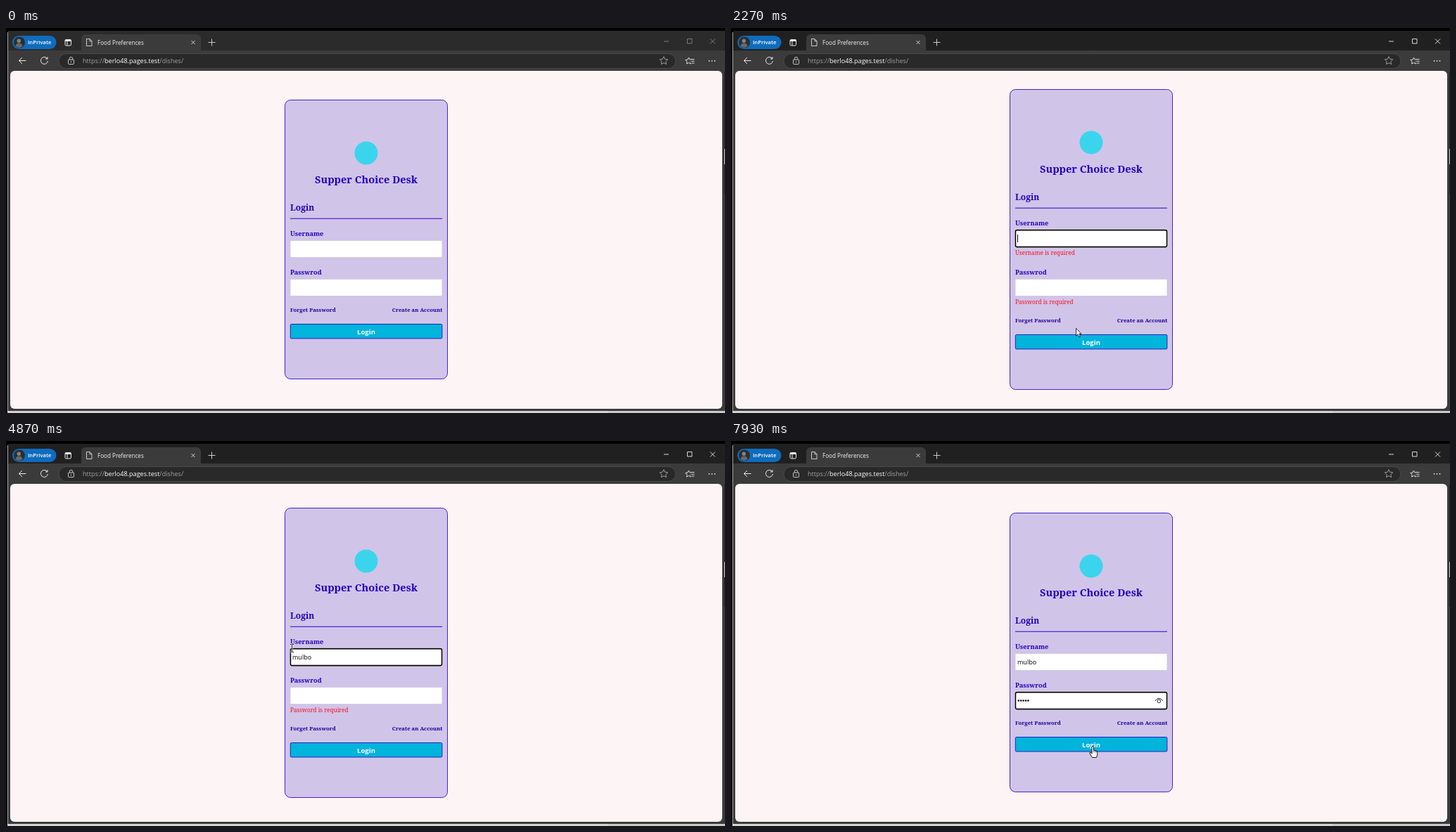
An HTML page with a canvas that plays this animation: 1022x548 px, repeating every 8 s.

```html
<!DOCTYPE html>
<html lang="en">
<head>
<meta charset="utf-8">
<title>Food Preferences</title>
<style>
html, body { margin: 0; width: 100%; height: 100%; overflow: hidden; background: #000; }
canvas { display: block; width: 1022px; height: 548px; }
</style>
</head>
<body>
<canvas id="stage" width="1022" height="548"></canvas>
<script>
const ctx = document.getElementById('stage').getContext('2d');
const SANS = '"Open Sans", sans-serif', SERIF = '"Noto Serif", serif';
const INK = '#2200b9', EDGE = '#2a00c8', ERROR = '#f5101f', CHROME = '#3b3b3b';
const LOOP = 8000, TICKS_PER_SECOND = 15;

// All times are in ticks of 1/15 s.
const CLICK_USER = 10, PRESS = 32, SUBMIT = 34, CLICK_PASS = 88, BLINK = 8;
const USER_KEYS = [57, 58, 61, 63, 65], PASS_KEYS = [99, 101, 102, 104, 106];
const USER_NAME = 'mulbo';
const CARET_RESETS = [CLICK_USER, SUBMIT, ...USER_KEYS, CLICK_PASS, ...PASS_KEYS];

// Each stop is tick, x, y.
const POINTER = [
  [3, 800, 530], [5, 640, 425], [7, 530, 350], [9, 480, 322], [10, 477, 320],
  [24, 477, 320], [27, 481, 352], [30, 489, 412], [31, 490, 427],
  [38, 490, 427], [39, 500, 417], [41, 440, 370], [43, 362, 326], [45, 317, 304],
  [47, 356, 294], [49, 406, 295],
  [81, 406, 295], [83, 420, 312], [85, 446, 343], [87, 459, 354],
  [116, 459, 354], [117, 475, 381], [118, 503, 424], [119, 514, 434]
];

function pointerAt(tick) {
  if (tick < POINTER[0][0]) return null;
  const next = POINTER.findIndex(p => p[0] >= tick);
  const b = POINTER[next], a = POINTER[Math.max(0, next - 1)];
  const k = b === a ? 0 : (tick - a[0]) / (b[0] - a[0]);
  return { x: Math.round(a[1] + (b[1] - a[1]) * k), y: Math.round(a[2] + (b[2] - a[2]) * k) };
}

function stateAt(tick) {
  const count = keys => keys.filter(k => k <= tick).length;
  const user = count(USER_KEYS), pass = count(PASS_KEYS);
  const userError = tick >= SUBMIT && !user, passError = tick >= SUBMIT && !pass;
  let focus = '';
  if (tick >= CLICK_PASS) focus = 'pass';
  else if (tick >= SUBMIT || (tick >= CLICK_USER && tick < PRESS)) focus = 'user';
  const reset = Math.max(...CARET_RESETS.filter(k => k <= tick));
  const caret = Math.floor((tick - reset) / BLINK) % 2 === 0;
  return { active: tick >= CLICK_USER, user, pass, userError, passError, focus, caret };
}

function layoutFor(s) {
  const u = s.userError ? 15 : 0, p = s.passError ? 15 : 0;
  const top = 102 - Math.floor((u + p) / 2);
  return { top, height: 398 + u + p, user: top + 200, pass: top + 255 + u, foot: top + 299 + u + p, button: top + 319 + u + p };
}

function box(x, y, w, h, r, fill, stroke, line = 1) {
  ctx.beginPath();
  ctx.roundRect(x, y, w, h, r);
  if (fill) { ctx.fillStyle = fill; ctx.fill(); }
  if (stroke) { ctx.strokeStyle = stroke; ctx.lineWidth = line; ctx.stroke(); }
}

function disc(x, y, r, fill) {
  ctx.beginPath();
  ctx.arc(x, y, r, 0, Math.PI * 2);
  ctx.fillStyle = fill;
  ctx.fill();
}

function path(d, stroke, line = 1, fill) {
  const p = new Path2D(d);
  if (fill) { ctx.fillStyle = fill; ctx.fill(p); }
  if (stroke) { ctx.strokeStyle = stroke; ctx.lineWidth = line; ctx.stroke(p); }
}

function text(str, x, y, font, color, align = 'left') {
  ctx.font = font;
  ctx.fillStyle = color;
  ctx.textAlign = align;
  ctx.fillText(str, x, y);
  return x + ctx.measureText(str).width;
}

function star(x, y, r, color) {
  ctx.beginPath();
  for (let i = 0; i < 10; i++) {
    const a = Math.PI * (i / 5 - 0.5), d = i % 2 ? r * 0.5 : r;
    ctx.lineTo(x + d * Math.cos(a), y + d * Math.sin(a));
  }
  ctx.closePath();
  ctx.strokeStyle = color;
  ctx.lineWidth = 0.9;
  ctx.stroke();
}

function drawTitleBar(active) {
  box(0, 0, 1022, 548, 0, '#000');
  box(3, 4, 1019, 541, 0, CHROME);
  box(3, 4, 1019, 28, 0, active ? '#202020' : '#2b2b2b');
  box(2, 6, 1, 539, 0, '#aaa');
  box(2, 545, 1020, 3, 0, '#d4d4d4');
  box(855, 545, 167, 3, 0, '#c9c9c9');
  box(1021, 62, 1, 174, 0, '#222');
  box(1021, 172, 1, 22, 0, '#ccc');

  box(9, 11, 62.5, 19, 9.5, '#0f6cbd');
  disc(19, 20.5, 8, '#2c2e31');
  disc(18.3, 18.2, 2.7, '#858380');
  path('M13.5 26 Q14 21.5 18.5 21.5 Q23 21.5 23.5 26 Q19 30 13.5 26', null, 0, '#65686b');
  text('InPrivate', 31, 23.3, '600 7.7px ' + SANS, '#fff');

  box(84, 16.5, 8.5, 8.5, 1.5, null, '#eee');
  box(84, 16.5, 8.5, 2.5, 1, '#eee');
  box(86.5, 16.5, 1, 8, 0, '#eee');

  box(107, 9, 170, 23, [6, 6, 0, 0], CHROME);
  path('M114.5 15.5 H119 L122 18.7 V25.5 H114.5 Z M119 15.5 V18.7 H122', '#ddd', 0.9);
  text('Food Preferences', 130, 23.5, '8.1px ' + SANS, '#f3f3f3');
  path('M263.5 18 l5 5 m0 -5 l-5 5', '#ddd', 0.9);
  path('M287.5 20.5 h10 m-5 -5 v10', '#ddd', 0.9);
  path('M935 19 h7 M968.5 15.5 h6.5 v6.5 h-6.5 z M1001 15.5 l7 7 m0 -7 l-7 7', active ? '#eee' : '#858585', 0.9);
}

function drawToolbar() {
  path('M28.5 46.5 H18.5 M23 42 L18.5 46.5 L23 51', '#eee', 1);
  path('M58.6 43.6 A5 5 0 1 0 59.4 47 M59 41.2 V44 H56', '#eee', 1);
  box(75, 36.5, 877, 21, 10.5, '#292929', '#505050', 0.8);
  box(88.5, 45, 8, 6.5, 1, null, '#ddd', 0.9);
  path('M90.3 45 V43.5 A2.2 2.2 0 0 1 94.7 43.5 V45', '#ddd', 0.9);
  disc(92.5, 48.2, 0.8, '#ddd');
  const font = '9.1px ' + SANS, grey = '#a0a0a0';
  let x = text('https://', 109, 50, font, grey);
  x = text('berlo48.pages.test', x, 50, font, '#fff');
  text('/dishes/', x, 50, font, grey);
  star(935, 46.7, 6, '#aaa');
  star(970.5, 47, 5, '#eee');
  box(973, 44, 6, 6, 0, CHROME);
  path('M973 44.5 h5.5 M974 47.2 h4.5 M974.5 50 h4', '#eee', 0.9);
  for (const dx of [0, 4, 8]) disc(999.5 + dx, 46.8, 0.9, '#eee');
}

function drawField(y, focused) {
  if (focused) {
    box(403.2, y - 0.8, 217.6, 26.6, 3, '#fff');
    box(404.4, y + 0.6, 215.2, 24, 2, '#fff', '#000', 1.6);
  } else {
    box(404, y, 216, 25, 0, '#d3cbe1');
    box(404.5, y + 1, 215, 23, 0, '#fff');
  }
}

function drawCaret(x, y) {
  box(Math.round(x), y, 1, 11, 0, '#000');
}

function drawEye(y) {
  path(`M602.8 ${y} Q608.3 ${y - 7.5} 613.8 ${y}`, '#222', 1);
  ctx.beginPath();
  ctx.arc(608.3, y + 0.3, 2.3, 0, Math.PI * 2);
  ctx.stroke();
}

function drawCard(s, l) {
  const label = '600 9.2px ' + SERIF, link = '600 7.75px ' + SERIF, note = '8.2px ' + SERIF;
  box(396.5, l.top + 0.5, 231, l.height - 1, 8, '#d1c4e9', EDGE, 0.85);
  disc(512, l.top + 76, 16.5, '#3ad5ec');
  text('Supper Choice Desk', 512, l.top + 119, '600 14.6px ' + SERIF, INK, 'center');
  text('Login', 404, l.top + 158, '600 12px ' + SERIF, INK);
  box(404, l.top + 168.8, 216, 0.9, 0, EDGE);

  text('Username', 404, l.user - 6.5, label, INK);
  drawField(l.user, s.focus === 'user');
  const end = text(USER_NAME.slice(0, s.user), 407, l.user + 15.5, '9px ' + SANS, '#000');
  if (s.focus === 'user' && s.caret) drawCaret(end, l.user + 7);
  if (s.userError) text('Username is required', 404, l.user + 36, note, ERROR);

  text('Passwrod', 404, l.pass - 6.5, label, INK);
  drawField(l.pass, s.focus === 'pass');
  for (let i = 0; i < s.pass; i++) disc(408.8 + 3.4 * i, l.pass + 12.5, 1.25, '#000');
  if (s.focus === 'pass' && s.caret) drawCaret(407 + 3.4 * s.pass, l.pass + 7);
  if (s.pass) drawEye(l.pass + 13);
  if (s.passError) text('Password is required', 404, l.pass + 36, note, ERROR);

  text('Forget Password', 404, l.foot + 3, link, '#1c0099');
  text('Create an Account', 620.5, l.foot + 3, link, '#1c0099', 'right');
  box(404.3, l.button + 0.5, 215.6, 20.5, 1.5, '#00b4dc', INK, 0.85);
  text('Login', 512, l.button + 14.5, '700 9.6px ' + SANS, '#fff', 'center');
}

function drawPointer({ x, y }, l) {
  const inside = (left, top, w, h) => x >= left && x < left + w && y >= top && y < top + h;
  ctx.save();
  ctx.translate(x, y);
  if (inside(404, l.button, 216, 22)) {
    path('M-1 1 Q0 -1 1.5 1 V6 L5 7 Q7 7.5 6.8 9.5 V12 L5.5 16.5 H-.5 L-4 11 Q-4.5 9 -3 9 L-1 11 Z', '#000', 0.9, '#fff');
    path('M1.5 6 V9 M3.4 7 V9.2 M5.2 7.2 V9.5', '#000', 0.6);
  } else if (inside(404, l.user - 2, 216, 27) || inside(404, l.pass - 3, 216, 28)) {
    const beam = 'M-2.5 -5.5 H-.6 L0 -5 L.6 -5.5 H2.5 M0 -5 V5 M-2.5 5.5 H-.6 L0 5 L.6 5.5 H2.5';
    ctx.translate(0.5, 0);
    path(beam, '#fff', 2);
    path(beam, '#222', 1);
  } else {
    path('M.5 .5 V11.5 L3 9 L4.7 13 L6.5 12.2 L4.9 8.3 H8 Z', '#000', 0.8, '#fff');
  }
  ctx.restore();
}

function draw(now) {
  // A small lead keeps rounded times on the right tick.
  const tick = Math.floor((now % LOOP) * TICKS_PER_SECOND / 1000 + 0.1);
  const state = stateAt(tick), layout = layoutFor(state), pointer = pointerAt(Math.min(tick, 119));
  drawTitleBar(state.active);
  drawToolbar();
  box(6, 61, 1012, 481, 6, '#fdf5f5');
  drawCard(state, layout);
  if (pointer) drawPointer(pointer, layout);
}

const start = performance.now();
function loop() {
  draw(performance.now() - start);
  requestAnimationFrame(loop);
}
loop();
</script>
</body>
</html>
```
